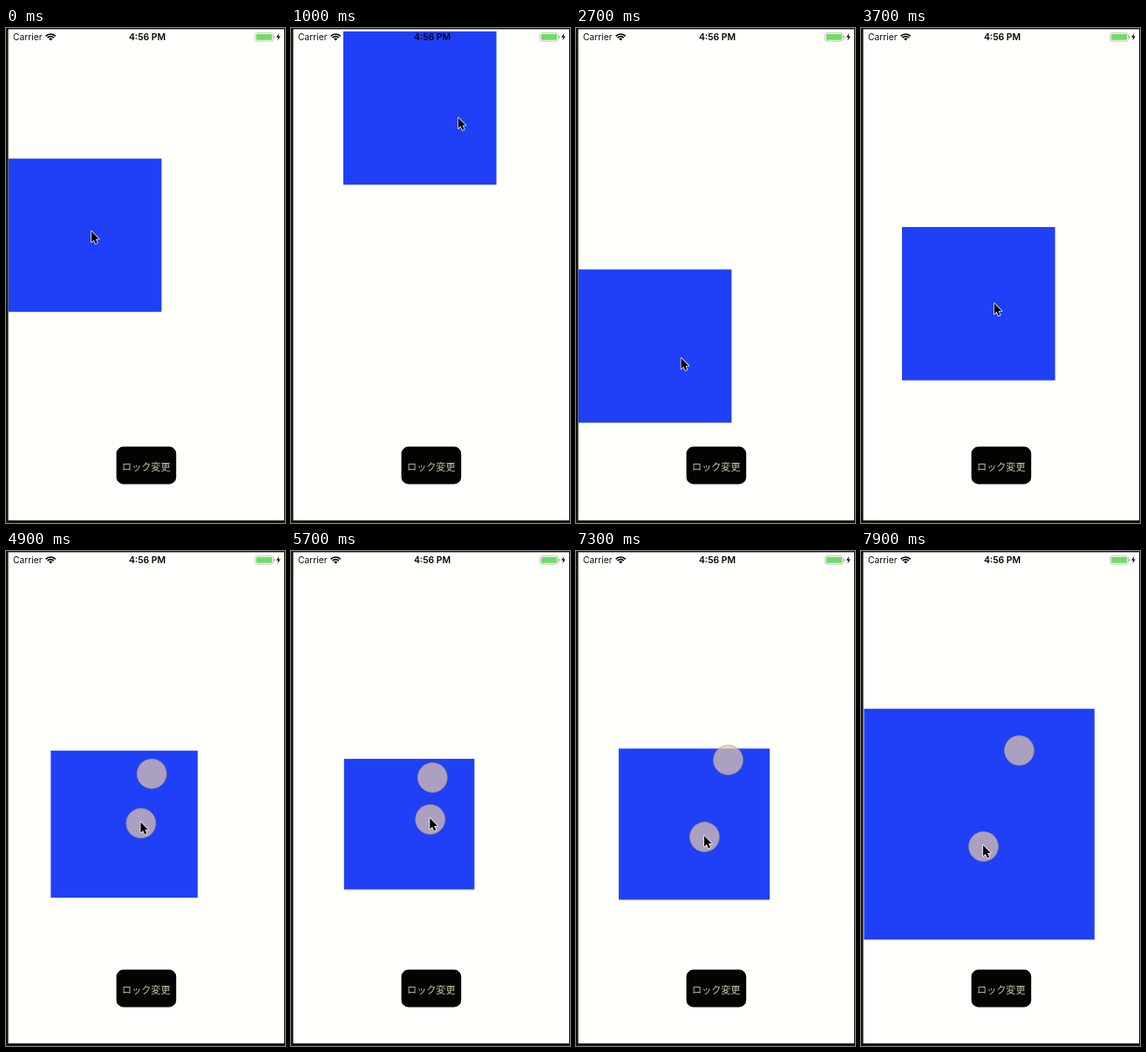
These frames come from a looping animation (320x567 px, 8000 ms). An HTML page with a canvas:

```html
<!DOCTYPE html>
<html lang="ja">
<head>
<meta charset="utf-8">
<title>Drag and pinch</title>
<style>
  html, body { margin: 0; width: 100%; height: 100%; overflow: hidden; background: #fffffb; }
  canvas { display: block; width: 320px; height: 567px; }
</style>
</head>
<body>
<canvas id="stage"></canvas>
<script>
const W = 320, H = 567, LOOP = 8000, STEP = 100;
const MID = { x: 161, y: 283.5 };
const SIDE = 175.6, PINCH_START = 4600;
const canvas = document.getElementById('stage');
const ctx = canvas.getContext('2d');
const dpr = window.devicePixelRatio || 1;
canvas.width = W * dpr;
canvas.height = H * dpr;

// seconds, pointer offset from the square's centre
const grip = [[0, 7.4, -4.5], [1, 44, 11], [1.9, 39.5, 25], [3.7, 18, -0.5]];
// seconds, lower touch relative to the screen centre, square side
const pinch = [[4.6, -8, 30, 175.6], [5.7, -1.3, 24, 149.6], [6.6, -5.4, 31.4, 66.8], [7.9, -20.5, 55, 264.4]];

const clamp = (v, lo, hi) => Math.min(hi, Math.max(lo, v));
const mix = (a, b, u) => a + (b - a) * u;
const ease = (t, from, to) => {
  const u = clamp((t - from) / (to - from), 0, 1);
  return u * u * (3 - 2 * u);
};

function along(keys, t) {
  const next = keys.findIndex(k => k[0] > t);
  if (next < 0) return keys[keys.length - 1].slice(1);
  const a = keys[next - 1], b = keys[next];
  const u = (t - a[0]) / (b[0] - a[0]);
  return a.slice(1).map((v, i) => mix(v, b[i + 1], u));
}

// Slowing laps around the screen, held inside its edges, then home to rest
function squareCentre(t) {
  const turn = -0.227 + 5.18 * t - 0.108 * t * t;
  const x = clamp(MID.x - 100 * Math.cos(turn), 90.6, 231.4);
  const y = clamp(MID.y + 205 * Math.sin(turn), 91.7, 475.4);
  const home = ease(t, 3.2, 3.7), settle = ease(t, 3.7, 4.4);
  return [mix(x, mix(134.8, 135.6, settle), home), mix(y, mix(315.8, 312.9, settle), home)];
}

function poly(points, x = 0, y = 0) {
  ctx.beginPath();
  points.forEach(([px, py]) => ctx.lineTo(x + px, y + py));
  ctx.closePath();
}

function box(x, y, w, h, r, color) {
  ctx.fillStyle = color;
  ctx.beginPath();
  ctx.roundRect(x, y, w, h, r);
  ctx.fill();
}

function text(str, x, y, font, color, align) {
  ctx.font = font;
  ctx.fillStyle = color;
  ctx.textAlign = align;
  ctx.fillText(str, x, y);
}

function wifi(x, y) {
  const from = -Math.PI * 0.76, to = -Math.PI * 0.24;
  ctx.strokeStyle = ctx.fillStyle = '#000';
  ctx.lineWidth = 1.7;
  for (const r of [7.6, 4.9]) {
    ctx.beginPath();
    ctx.arc(x, y, r, from, to);
    ctx.stroke();
  }
  ctx.beginPath();
  ctx.moveTo(x, y);
  ctx.arc(x, y, 2.9, from, to);
  ctx.fill();
}

function statusBar() {
  text('Carrier', 8, 14, '10.3px Inter, sans-serif', '#111', 'left');
  wifi(51.2, 14.6);
  text('4:56 PM', 162, 14, '600 10.4px Inter, sans-serif', '#000', 'center');
  ctx.strokeStyle = '#b4b4a8';
  ctx.lineWidth = 0.8;
  ctx.beginPath();
  ctx.roundRect(285.7, 5.7, 20.8, 9.4, 2.4);
  ctx.stroke();
  box(287, 7, 18.2, 6.8, 1.2, '#70dc68');
  box(307.2, 8.8, 1.2, 3.2, 0.6, '#b4b4a8');
  ctx.fillStyle = '#111';
  poly([[3.2, 0], [0, 4.8], [2.2, 4.8], [1.4, 8.6], [4.8, 3.6], [2.6, 3.6]], 310, 6);
  ctx.fill();
}

function button() {
  box(126.6, 479.6, 68.6, 42.8, 8, '#030400');
  text('ロック変更', 160.8, 506.5, '11.1px "Noto Sans CJK JP", "Noto Sans CJK", sans-serif', '#c6c6a0', 'center');
}

function frame() {
  ctx.fillStyle = '#15150a';
  ctx.fillRect(0, 0, 2.6, H);
  ctx.fillRect(0, 0, W, 1.4);
  ctx.fillRect(0, H - 3, W, 3);
  ctx.fillRect(W - 1, 0, 1, H);
}

function disc(x, y, color) {
  ctx.beginPath();
  ctx.arc(x, y, 17, 0, Math.PI * 2);
  ctx.fillStyle = color;
  ctx.fill();
  ctx.strokeStyle = 'rgba(110,108,110,.6)';
  ctx.lineWidth = 0.7;
  ctx.stroke();
}

function touch(x, y, square) {
  disc(x, y, '#e0deba');
  ctx.save();
  ctx.beginPath();
  ctx.rect(...square);
  ctx.clip();
  disc(x, y, '#aca0c0');
  ctx.restore();
}

function pointer(x, y) {
  poly([[0, 0], [0, 12.4], [2.8, 9.8], [4.8, 14.3], [6.9, 13.4], [4.9, 8.9], [8.7, 8.9]], x, y);
  ctx.lineJoin = 'round';
  ctx.strokeStyle = '#fff';
  ctx.lineWidth = 1.5;
  ctx.stroke();
  ctx.fillStyle = '#000';
  ctx.fill();
}

function draw(t) {
  const pinching = t >= PINCH_START / 1000;
  const [cx, cy] = squareCentre(t);
  const [dx, dy, side] = pinching ? along(pinch, t) : [0, 0, SIDE];
  const square = [cx - side / 2, cy - side / 2, side, side];

  ctx.setTransform(dpr, 0, 0, dpr, 0, 0);
  ctx.fillStyle = '#fffffb';
  ctx.fillRect(0, 0, W, H);
  frame();
  ctx.fillStyle = '#2040f8';
  ctx.fillRect(...square);
  button();
  statusBar();
  if (pinching) {
    // The second touch mirrors the first about the screen centre
    touch(MID.x - dx, MID.y - dy, square);
    touch(MID.x + dx, MID.y + dy, square);
    pointer(MID.x + dx - 0.4, MID.y + dy - 1.4);
  } else {
    const [ox, oy] = along(grip, t);
    pointer(cx + ox, cy + oy);
  }
}

const start = performance.now();
function tick() {
  const t = (performance.now() - start) % LOOP;
  draw(Math.floor(t / STEP) * STEP / 1000);
  requestAnimationFrame(tick);
}
tick();
</script>
</body>
</html>
```
